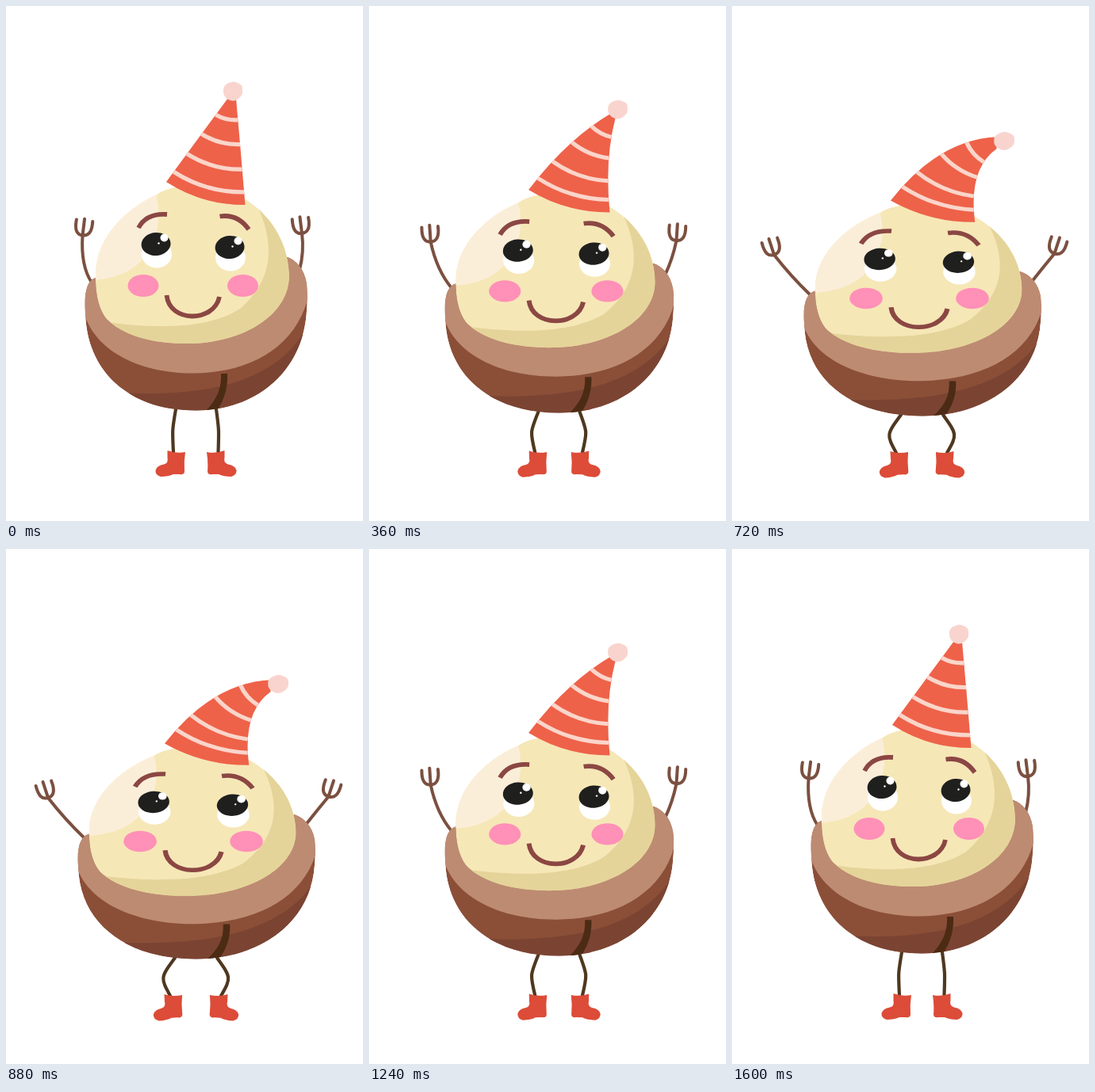
An HTML page that plays this animation: 450 by 650 pixels, repeating every 1.68 s.

```html
<!DOCTYPE html>
<html lang="en">
<head>
<meta charset="utf-8">
<title>Party nut</title>
<style>
  html, body { margin: 0; width: 100%; height: 100%; overflow: hidden; background: #fff; }
  svg { display: block; width: 450px; height: 650px; }
  .line { fill: none; stroke-linecap: round; stroke-linejoin: round; }
</style>
</head>
<body>
<svg viewBox="0 0 450 650">
  <defs>
    <path id="shell" d="M113 343C102 346 98 362 100 388C102 464 158 511 240 510.500C320 510 375 457 379 385C380 375 380 360 379 350C376 332 366 321 355 317Z"/>
    <path id="cream" d="M190 238C148 257 110 296 113 345C113 365 118 388 130 398C155 420 195 427 235 426C300 424 357 390 357 340C356 300 335 265 302 244C275 222 212 221 190 238Z"/>
    <path id="boot" d="M203.500 561Q214 565 226 563Q224 575 225 588Q224 592 219 591H211Q205 594 195 594Q188 592 188.500 586Q190 580 199 578.500Q205 577 203.500 570Z"/>
    <g id="hand" class="line" stroke="#7b5040" stroke-width="4">
      <path d="M-10 -19C-11 -5 -7 0 0 0S11.500 -5 10.500 -19M0 0V-21"/>
    </g>
    <clipPath id="inShell"><use href="#shell"/></clipPath>
    <clipPath id="inCream"><use href="#cream"/></clipPath>
    <clipPath id="inHat"><path id="hatClip"/></clipPath>
  </defs>

  <g class="line" stroke="#7b5040" stroke-width="4">
    <path id="armL"/><path id="armR"/>
  </g>
  <use id="handL" href="#hand"/><use id="handR" href="#hand"/>
  <g class="line" stroke="#4f3820" stroke-width="4.200">
    <path id="legL"/><path id="legR"/>
  </g>
  <g fill="#dc4c38"><use id="bootL" href="#boot"/><use id="bootR" href="#boot"/></g>

  <g id="body">
    <g clip-path="url(#inShell)">
      <use href="#shell" fill="#8b4f38"/>
      <path fill="#7b4432" d="M140 488C250 494 350 477 386 392V520H140Z"/>
      <path fill="#bd8b72" d="M90 300L99 389C112 433 165 464 237 463.500C310 463 366 429 381 367V300Z"/>
      <path fill="#4c2b14" d="M271 464H279C280 485 273 500 266 511H252C264 498 272 485 271 464Z"/>
    </g>
    <g clip-path="url(#inCream)">
      <use href="#cream" fill="#f6e7b7"/>
      <path fill="#fbeed9" d="M187 230C198 265 192 295 170 322C155 337 135 345 105 346V230Z"/>
      <path fill="#e5d499" d="M318 255C338 300 338 345 295 382C255 408 190 408 120 398V440H370V250Z"/>
    </g>
    <g fill="#ff90b7">
      <ellipse cx="173" cy="353" rx="19.500" ry="14"/>
      <ellipse cx="298.500" cy="353" rx="19.500" ry="14"/>
    </g>
    <g id="eye">
      <ellipse cx="190" cy="313.500" rx="19" ry="17" fill="#fff"/>
      <ellipse cx="189" cy="300.500" rx="18.500" ry="14.500" fill="#1f1f1e" transform="rotate(-5 189 300)"/>
      <g fill="#fff">
        <circle cx="199.500" cy="292.500" r="5"/>
        <circle cx="192.500" cy="299.500" r="1.200"/>
      </g>
    </g>
    <use href="#eye" x="93" y="4"/>
    <g fill="none" stroke="#8b4743" stroke-width="5.800">
      <path d="M167 280Q177 261 203 263"/>
      <path d="M269.500 265.500Q292 262 306 282"/>
      <path d="M202.500 365C206 400 262 400 269 367"/>
    </g>
    <path id="hat" fill="#ee6249"/>
    <path id="stripes" clip-path="url(#inHat)" fill="none" stroke="#fbd5ca" stroke-width="5.200"/>
    <path id="pom" fill="#f9d4ce" d="M-5 -11Q1 -14 6 -11Q13 -9 12 -1Q13 4 7 9Q1 14 -6 10Q-12 6 -12 0Q-13 -8 -5 -11Z"/>
  </g>
</svg>

<script>
const LOOP = 1680, STEP = 40, SWING = 1600;
const $ = id => document.getElementById(id);
const set = (id, name, value) => $(id).setAttribute(name, value);
const mix = (a, b, u, bow = 0) => a + (b - a) * (u + bow * u * (1 - u));
const mixPoint = (a, b, u, bowX, bowY) => [mix(a[0], b[0], u, bowX), mix(a[1], b[1], u, bowY)];
const quad = (a, c, b, t) => a.map((v, i) =>
  v * (1 - t) ** 2 + 2 * c[i] * t * (1 - t) + b[i] * t * t);

// Control point of an arc sagging below the chord a-b
const sag = (a, b) => [
  (a[0] + b[0]) / 2 - 0.15 * (b[1] - a[1]),
  (a[1] + b[1]) / 2 + 0.15 * (b[0] - a[0])
];

function drawArm(side, shoulder, elbow, wrist, turn) {
  set('arm' + side, 'd', `M${shoulder}Q${elbow} ${wrist}`);
  set('hand' + side, 'transform', `translate(${wrist}) rotate(${turn})`);
}

function drawLeg(side, hip, knee, ankle) {
  set('leg' + side, 'd', `M${hip}C${knee} ${knee} ${ankle}`);
}

function drawHat(u) {
  const baseL = [202, 222], baseR = [301.5, 251];
  const tipL = mixPoint([280, 116], [328, 137], u, 0.29, -0.55);
  const tipR = mixPoint([290, 117], [327, 153], u, 0.29, -0.55);
  const bendL = mixPoint([241, 169], [259, 140], u);
  const bendR = mixPoint([296, 184], [293.5, 180], u);
  const outline = `M${baseL}Q${bendL} ${tipL}L${tipR}Q${bendR} ${baseR}Q${sag(baseL, baseR)} ${baseL}Z`;
  set('hat', 'd', outline);
  set('hatClip', 'd', outline);

  set('stripes', 'd', [0.12, 0.335, 0.57, 0.8].map((t, i) => {
    const s = i ? t - 0.07 * u : t;
    const a = quad(baseL, bendL, tipL, s), b = quad(baseR, bendR, tipR, s);
    return `M${a}Q${sag(a, b)} ${b}`;
  }).join(''));

  set('pom', 'transform', `translate(${mixPoint([286, 108], [336, 143], u, 0.29, -0.55)})`);
}

function draw(time) {
  const t = Math.min(Math.floor(time % LOOP / STEP) * STEP, SWING);
  const u = (1 - Math.cos(2 * Math.PI * t / SWING)) / 1.952;

  set('body', 'transform',
    `translate(${239 + 0.5 * u} ${510 + 7 * u}) scale(${1 + 0.068 * u} ${1 - 0.057 * u}) translate(-239 -510)`);
  drawHat(u);

  drawArm('L', mixPoint([108, 349], [99, 365], u), mixPoint([94, 328], [74, 341], u),
    mixPoint([96.5, 289.5], [53, 314], u, 0, -0.4), 7 - 25 * u);
  drawArm('R', mixPoint([370, 333], [377, 349], u), mixPoint([376, 310], [392, 330], u),
    mixPoint([373, 287], [406.5, 312.5], u, 0, -0.3), 25 * u - 7);

  drawLeg('L', [214 - u, 509 + 7 * u], mixPoint([209.5, 535], [194.5, 541], u), [211 - 4 * u, 563 + u]);
  drawLeg('R', [265 + u, 509 + 7 * u], mixPoint([268.5, 535], [284, 541], u), [267.5 + 3.5 * u, 563 + u]);
  const step = `translate(${-2.5 * u} ${u}) rotate(${-3 * u} 205 590)`;
  set('bootL', 'transform', step);
  set('bootR', 'transform', `translate(479 0) scale(-1 1) ${step}`);
}

const start = performance.now();
function tick() {
  draw(performance.now() - start);
  requestAnimationFrame(tick);
}
tick();
</script>
</body>
</html>
```
